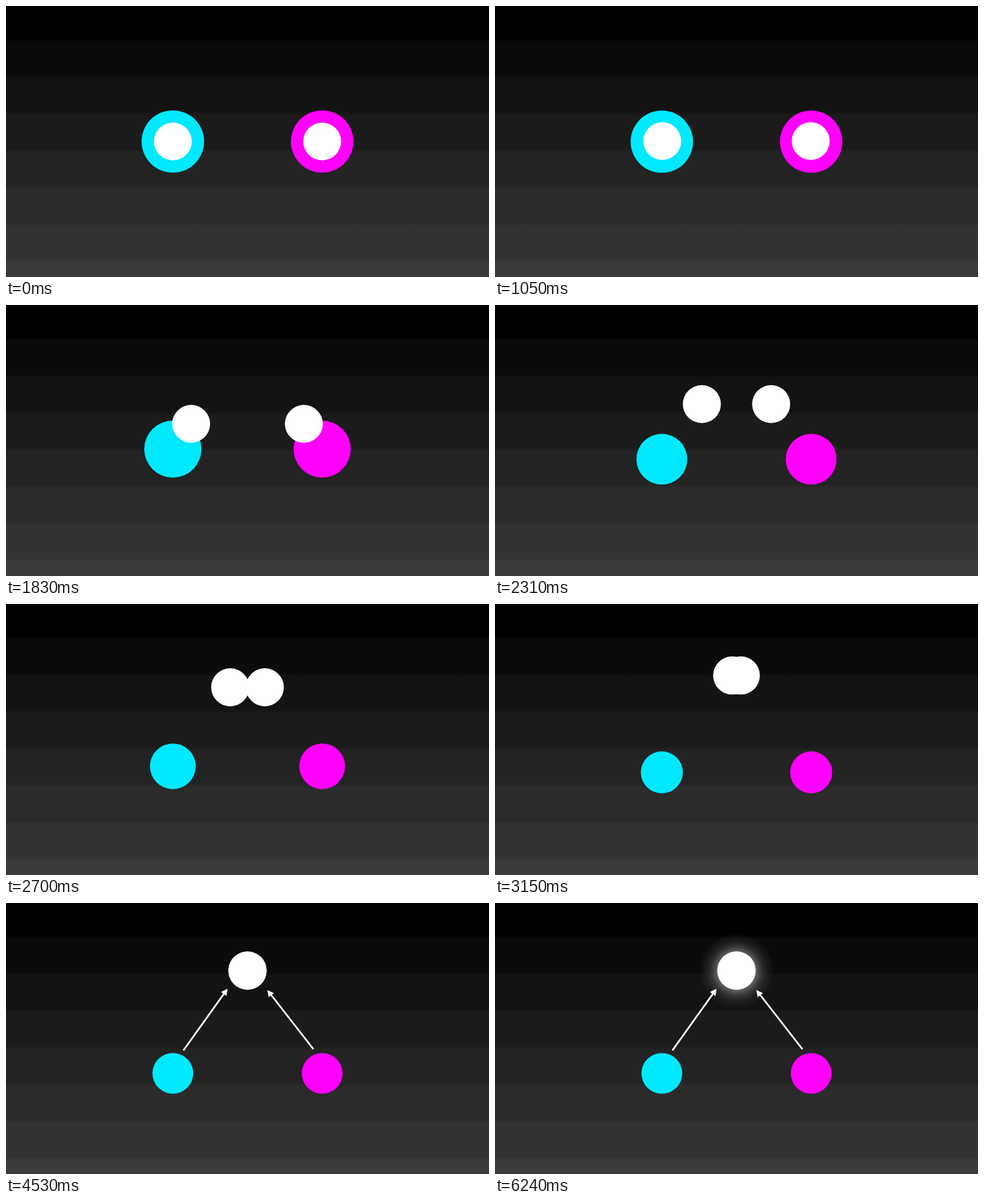
These frames come from a looping animation (720 px wide and 405 px high, 7230 ms). An HTML page with a canvas:

```html
<!DOCTYPE html>
<html lang="en">
<head>
<meta charset="utf-8">
<title>Two circles combine into one</title>
<style>
html, body { margin: 0; width: 100%; height: 100%; overflow: hidden; background: #000; }
canvas { display: block; }
</style>
</head>
<body>
<canvas id="stage" width="720" height="405"></canvas>
<script>
const ctx = document.getElementById('stage').getContext('2d');
const LOOP = 7230, STEP = 30;
const MOVE_START = 908, MOVE_TIME = 2688;
const ARROWS_AT = 4530;
const GLOW_START = 5430, GLOW_TIME = 810;

const mix = (a, b, k) => a + (b - a) * k;
const clamp = v => Math.min(1, Math.max(0, v));

// Constant acceleration, steady speed, constant braking
function ease(u, ramp = 0.4) {
  const speedUp = v => v * v / (2 * ramp * (1 - ramp));
  if (u < ramp) return speedUp(u);
  if (u > 1 - ramp) return 1 - speedUp(1 - u);
  return 0.5 + (u - 0.5) / (1 - ramp);
}

// Softly stepped backdrop
const backdrop = ctx.createLinearGradient(0, 0, 0, 405);
const greys = [0, 11, 19, 27, 35, 43, 51, 58].map(g => `rgb(${g},${g},${g})`);
greys.forEach((grey, i) => {
  if (i) backdrop.addColorStop((55 * i - 1) / 405, grey);
  if (i < greys.length - 1) backdrop.addColorStop((55 * i + 48) / 405, grey);
});

const glow = ctx.createRadialGradient(360, 101, 28, 360, 101, 56);
[[0, 0.36], [0.18, 0.24], [0.4, 0.125], [0.65, 0.055], [0.9, 0.02], [1, 0]]
  .forEach(([at, alpha]) => glow.addColorStop(at, `rgba(255,255,255,${alpha})`));

function disc(x, y, r, fill) {
  ctx.fillStyle = fill;
  ctx.beginPath();
  ctx.arc(x, y, r, 0, 2 * Math.PI);
  ctx.fill();
}

function arrow(x1, y1, x2, y2) {
  const length = Math.hypot(x2 - x1, y2 - y1);
  ctx.save();
  ctx.translate(x1, y1);
  ctx.rotate(Math.atan2(y2 - y1, x2 - x1));
  ctx.fillStyle = '#fff';
  ctx.fillRect(0, -1.3, length - 8, 2.6);
  ctx.beginPath();
  ctx.moveTo(length, 0);
  ctx.lineTo(length - 9.8, -5);
  ctx.lineTo(length - 9.8, 5);
  ctx.fill();
  ctx.restore();
}

function draw(now) {
  const t = Math.floor(now % LOOP / STEP) * STEP;
  const k = ease(clamp((t - MOVE_START) / MOVE_TIME));
  ctx.fillStyle = backdrop;
  ctx.fillRect(0, 0, 720, 405);

  ctx.globalAlpha = clamp((t - GLOW_START) / GLOW_TIME);
  disc(360, 101, 56, glow);
  ctx.globalAlpha = 1;

  const sides = [[248.7, '#00e9ff'], [471.3, '#ff00fa']];
  for (const [x, color] of sides)
    disc(x, mix(202.5, 254.6, k), mix(46.6, 30.4, k), color);
  for (const [x] of sides)
    disc(mix(x, 360, k), mix(202.5, 101, k), mix(28.2, 28.5, k), '#fff');

  if (t >= ARROWS_AT) {
    arrow(264.5, 220.3, 330.3, 128);
    arrow(458.3, 218.5, 389.5, 130);
  }
}

const start = performance.now();
function frame() {
  draw(performance.now() - start);
  requestAnimationFrame(frame);
}
frame();
</script>
</body>
</html>
```
